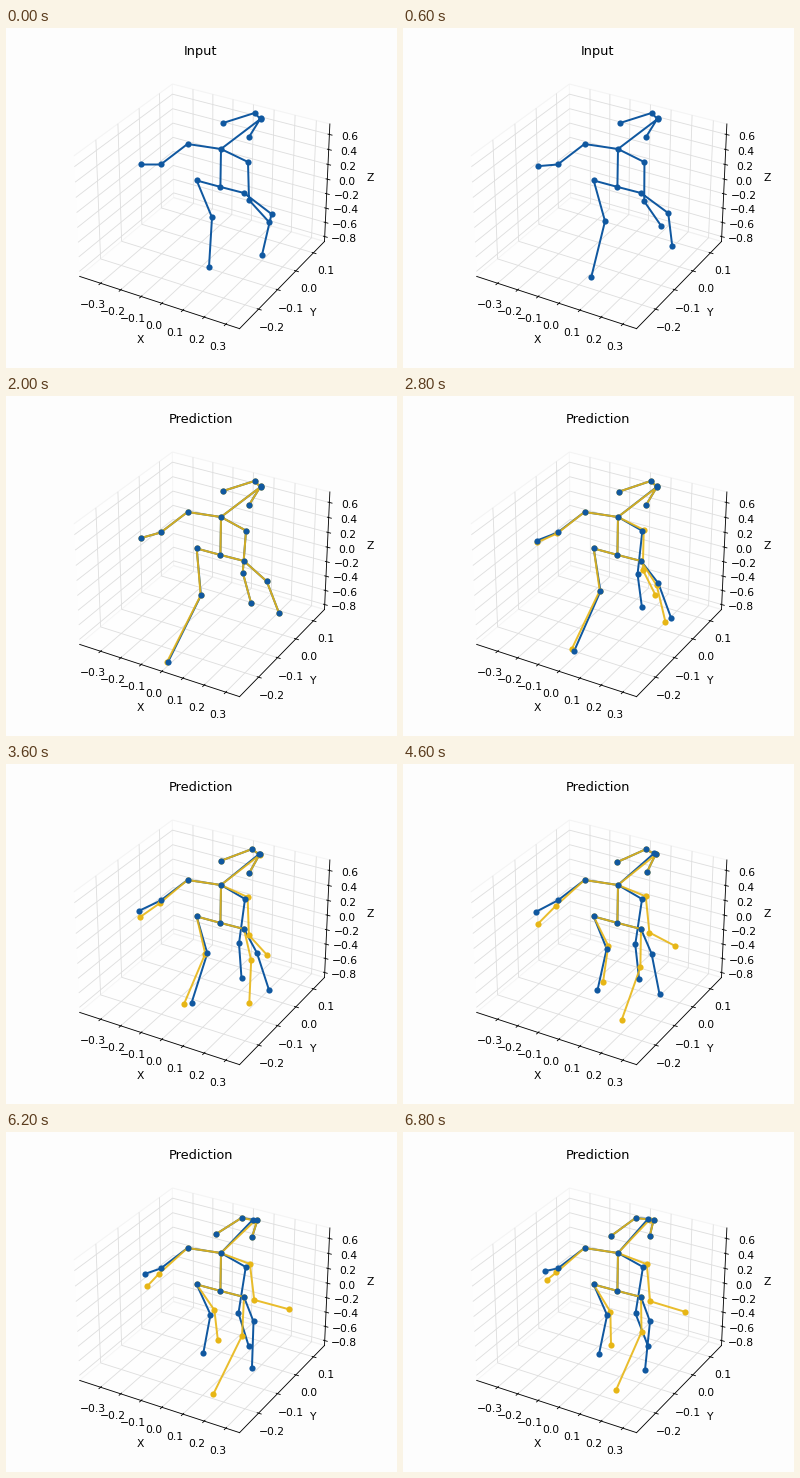
A matplotlib script for the animation above (7000 ms loop, 391 by 340 pixels).

```python
import numpy as np
import matplotlib.pyplot as plt
from matplotlib.animation import FuncAnimation

W, H, DPI = 391, 340, 77
FRAMES, STEP_MS = 35, 200
SPLIT, END = 2.0, 6.8  # seconds: first predicted pose, last pose
BLUE, YELLOW = "#1058a0", "#e7b616"

plt.rcParams.update({
    "font.family": "DejaVu Sans",
    "grid.color": "#dedede",
    "grid.linewidth": 0.8,
})

CHAINS = [
    "pelvis hip_r knee_r foot_r",
    "pelvis hip_l knee_l foot_l",
    "pelvis neck nose",
    "neck shoulder_r elbow_r wrist_r",
    "neck shoulder_l elbow_l wrist_l",
    "nose eye_r ear_r",
    "nose eye_l ear_l",
]

# Joints that stay in place, in pixels of the stage.
STILL = {
    "pelvis": (214.4, 158.9), "hip_r": (190.7, 152.5), "hip_l": (238, 165),
    "neck": (215, 121), "shoulder_r": (181.5, 116), "elbow_r": (154.7, 136.5),
}

# Head joints: place while looking ahead, and shift when fully turned.
HEAD = {
    "nose": ((254.5, 91), (-9.5, -4)), "eye_l": ((254.5, 90.5), (-4, -2.5)),
    "eye_r": ((248.5, 85), (-16, 1)), "ear_r": ((217, 95), (-9, 9)),
    "ear_l": ((242.7, 109.5), (4, -5)),
}

# Limb joints: seconds and the points passed at those times.
PATHS = {
    "shoulder_l": ([0, 3.6, END], [(242, 134), (239, 135), (240, 135)]),
    "elbow_l": ([0, 3.6, END], [(243, 172), (233, 179.5), (232.5, 181.5)]),
    "wrist_l": ([0, 3.6, END], [(263, 194), (235.5, 214), (245, 214)]),
    "wrist_r": ([0, 2, 4.6, END],
                [(134.5, 136.5), (135, 142), (132.5, 148), (142, 139)]),
    "knee_l": ([0, 1.2, 3.6, END],
               [(265.5, 186), (264.5, 184.5), (251, 189), (247, 189.5)]),
    "foot_l": ([0, 1.2, 2, 3.6, END],
               [(256, 227), (278, 212), (273, 217), (263, 226), (242, 238)]),
    "foot_r": ([0, 2, 3.6, 5.4, END],
               [(203, 239), (162, 266), (185.5, 239), (198, 220.5),
                (196, 222)]),
}
GUESSED_FOOT = ([2, 3.6, 5.4, END],
                [(161, 266), (178, 240), (213.5, 206), (208, 213)])

# Largest errors of the prediction.
REACH = {"shoulder_l": (4.2, -3), "elbow_l": (16, -13.5),
         "wrist_l": (41, -37.5)}
SWAY = {"foot_l": (-44, 30), "knee_l": (-13, 16), "wrist_r": (2.5, 14),
        "elbow_r": (-2, 6), "nose": (2.5, 1)}


def glide(keys, points, t):
    """Smooth cubic path through the key points."""
    keys, points = np.array(keys, float), np.array(points, float)
    slopes = np.gradient(points, keys, axis=0)
    i = int(np.clip(np.searchsorted(keys, t, "right") - 1, 0, len(keys) - 2))
    span = keys[i + 1] - keys[i]
    s = (t - keys[i]) / span
    return ((1 + 2 * s) * (1 - s) ** 2 * points[i]
            + s * (1 - s) ** 2 * span * slopes[i]
            + s * s * (3 - 2 * s) * points[i + 1]
            + s * s * (s - 1) * span * slopes[i + 1])


def progress(t):
    return max(0, (t - SPLIT) / (END - SPLIT))


def bend_knee(pose):
    """The right knee follows its foot."""
    pose["knee_r"] = pose["foot_r"] * (0.27, 0.37) + (151.2, 101)


def true_pose(t):
    pose = {name: np.array(p, float) for name, p in STILL.items()}
    turn = progress(t) ** 1.6
    for name, (rest, shift) in HEAD.items():
        pose[name] = np.array(rest) + turn * np.array(shift)
    for name, path in PATHS.items():
        pose[name] = glide(*path, t)
    bend_knee(pose)
    return pose


def predicted_pose(t):
    pose = true_pose(t)
    u = progress(t)
    for part, amount in ((REACH, np.sin(2 * u)),
                         (SWAY, np.sin(2.2 * u) ** 2)):
        for name, error in part.items():
            pose[name] = pose[name] + amount * np.array(error)
    pose["foot_r"] = glide(*GUESSED_FOOT, t)
    bend_knee(pose)
    return pose


class Skeleton:
    def __init__(self, ax, color, line_z, dot_z, alpha=1):
        self.bones, = ax.plot([], [], color=color, lw=1.85, alpha=alpha,
                              zorder=line_z, solid_joinstyle="round")
        self.dots, = ax.plot([], [], "o", color=color, ms=5.8, mew=0,
                             zorder=dot_z)

    def show(self, pose):
        gap = np.full(2, np.nan)
        path = []
        for chain in CHAINS:
            path += [pose[name] for name in chain.split()] + [gap]
        self.bones.set_data(*np.array(path).T)
        self.dots.set_data(*np.array(list(pose.values())).T)

    def hide(self):
        self.bones.set_data([], [])
        self.dots.set_data([], [])


def make_box(fig):
    side = 284.6
    ax = fig.add_axes([52.2 / W, 21.4 / H, side / W, side / H],
                      projection="3d")
    ax.patch.set_visible(False)
    ax.set(xlim=(-0.405, 0.363), ylim=(-0.296, 0.165), zlim=(-0.87, 0.738),
           xlabel="X", ylabel="Y", zlabel="Z")
    ax.set_xticks(np.arange(-3, 4) / 10)
    ax.set_yticks(np.arange(-2, 2) / 10)
    ax.set_zticks(np.arange(-4, 4) / 5)
    for axis in (ax.xaxis, ax.yaxis, ax.zaxis):
        axis.set_major_formatter("{x:.1f}")
        axis.pane.set_facecolor((1, 1, 1, 0))
        axis.pane.set_edgecolor("#ebebeb")


# The tiny surplus keeps the pixel size from rounding down.
fig = plt.figure(figsize=((W + 0.001) / DPI, (H + 0.001) / DPI), dpi=DPI,
                 facecolor="#fdfdfd")
make_box(fig)
title = fig.text(194.7 / W, 1 - 27 / H, "Input", size=12, ha="center",
                 va="baseline")

stage = fig.add_axes([0, 0, 1, 1])
stage.set_axis_off()
truth = Skeleton(stage, BLUE, line_z=2, dot_z=5)
guess = Skeleton(stage, YELLOW, line_z=3, dot_z=4, alpha=0.9)
stage.set(xlim=(0, W), ylim=(H, 0))


def draw(frame):
    t = frame * STEP_MS / 1000
    truth.show(true_pose(t))
    if t < SPLIT:
        title.set_text("Input")
        guess.hide()
    else:
        title.set_text("Prediction")
        guess.show(predicted_pose(t))
    return title, truth.bones, truth.dots, guess.bones, guess.dots


anim = FuncAnimation(fig, draw, frames=FRAMES, interval=STEP_MS, repeat=True)
plt.show()
```
